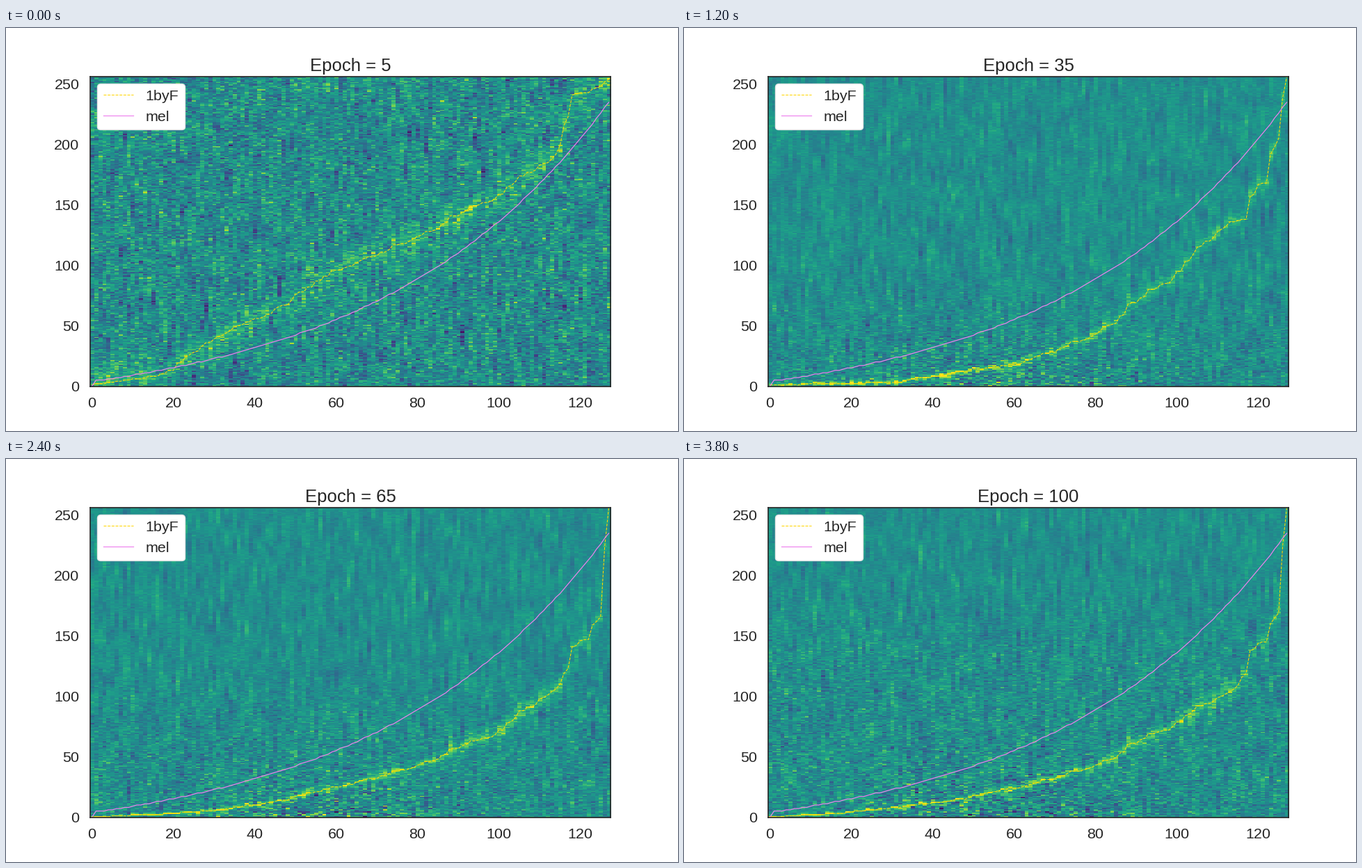
These frames come from a looping animation (966x580 px, 4000 ms). A matplotlib script:

```python
import numpy as np
import matplotlib.pyplot as plt
from matplotlib.animation import FuncAnimation

W, H, DPI = 966, 580, 100
FRAMES, STEP = 20, 200
ROWS, COLS = 257, 128
PX = 72 / DPI
INK = "0.15"

plt.rcParams.update({
    "font.family": "Liberation Sans", "font.size": 21.47 * PX,
    "text.color": INK, "xtick.color": INK, "ytick.color": INK,
    "axes.edgecolor": INK, "axes.linewidth": 1.68 * PX,
})

cols = np.arange(COLS)
rows = np.arange(ROWS)[:, None]
rng = np.random.default_rng(7)

# Peak row of the sorted filters at a few columns, for a few epochs
KNOTS = (0, 15, 30, 46, 60, 80, 100, 113, 118, 123, 127)
PEAKS = {
    5: (1, 8, 41, 64, 96, 123, 160, 188, 239, 248, 254),
    15: (1, 2, 3, 9, 40, 81, 121, 142, 170, 238, 255),
    35: (1, 2, 3, 11, 18, 42, 96, 136, 139, 208, 256),
    55: (0, 2, 5, 13, 25, 42, 70, 104, 133, 166, 256),
    100: (0, 3, 8, 14, 24, 42, 80, 104, 126, 171, 256),
}
# Sorting scattered positions gives the uneven staircase
scatter = np.sort(cols + rng.normal(0, 1.5, COLS))


def peak_at(epoch):
    """Staircase of peak rows, blended between the known epochs."""
    y = [np.interp(epoch, list(PEAKS), level) for level in zip(*PEAKS.values())]
    return np.round(np.interp(scatter, KNOTS, y))


def smooth(a, sigma):
    """Gaussian blur down the columns, rescaled to unit spread."""
    f = np.fft.rfftfreq(ROWS)[:, None]
    gain = np.exp(-2 * (np.pi * f * sigma) ** 2)
    out = np.fft.irfft(np.fft.rfft(a, axis=0) * gain, ROWS, axis=0)
    return out / out.std()


def white():
    return rng.standard_normal((ROWS, COLS))


def drift(noise, keep=0.75):
    return keep * noise + np.sqrt(1 - keep ** 2) * white()


def spectrum(epoch, peak, fine, mid, slow):
    early = np.exp(-(epoch - 5) / 11)
    img = .5 + .02 * np.exp(-((epoch - 15) / 10) ** 2) - .015 * early
    img = img + (.024 + .074 * early) * fine
    img += (.04 + .012 * early) * smooth(mid, 4.5)
    img -= (.04 + .05 * early) * np.clip(smooth(slow, 5) - 1, 0, 3)

    # Row-by-row ripple that climbs from the bottom
    climb = 1 / (1 + np.exp((rows - 1.5 * epoch) / 22))
    bump = np.exp(-((cols - 55) / 32) ** 2)
    low = .12 * (1 - early) * np.exp(-rows / 24) * bump
    img += (.05 * climb * (1 - early) + low) * fine

    # Ridge along the peaks, wide at first
    dist = rows - peak
    width = np.clip(.6 + .05 * peak, 0, 5) * (1 - early) + 8 * early
    gain = (.12 + .2 * np.exp(-peak / 40)) * (1 - early) + .12 * early
    img += gain * np.exp(-.5 * (dist / width) ** 2) * (1 + .3 * mid)
    img += .1 * (dist == 0)
    return np.clip(img, 0, 1)


epochs = [5 * (i + 1) for i in range(FRAMES)]
lines = [peak_at(e) for e in epochs]
images = []
fine, mid, slow = white(), white(), white()
for e, p in zip(epochs, lines):
    images.append(spectrum(e, p, fine, mid, slow))
    fine, mid, slow = drift(fine), drift(mid), drift(slow, .9)

mel = np.round(26.85 * 2.04 ** (cols / 40) - 23.1)
mel[:2] = 0, 5

fig = plt.figure(figsize=(W / DPI, H / DPI), dpi=DPI, facecolor="white")
ax = fig.add_axes([.125, .11, .775, .77])
im = ax.imshow(images[0], origin="lower", aspect="auto", cmap="viridis",
               vmin=0, vmax=1, interpolation="nearest")
peak_line, = ax.plot(cols, lines[0], "--", color="gold", lw=1.07 * PX,
                     label="1byF")
ax.plot(cols, mel, color="violet", lw=1.2 * PX, label="mel")
ax.set(xlim=(-.5, COLS - .5), ylim=(-.5, ROWS - .5),
       xticks=range(0, 121, 20), yticks=range(0, 251, 50))
ax.tick_params(length=0, pad=15.2 * PX)
title = ax.set_title("", fontsize=25.76 * PX, pad=8 * PX)
ax.legend(loc="upper left", framealpha=1, facecolor="white", edgecolor="0.9")


def update(i):
    im.set_data(images[i])
    peak_line.set_ydata(lines[i])
    title.set_text(f"Epoch = {epochs[i]}")
    return im, peak_line, title


anim = FuncAnimation(fig, update, frames=FRAMES, interval=STEP, repeat=True,
                     repeat_delay=0, blit=False)
plt.show()
```
